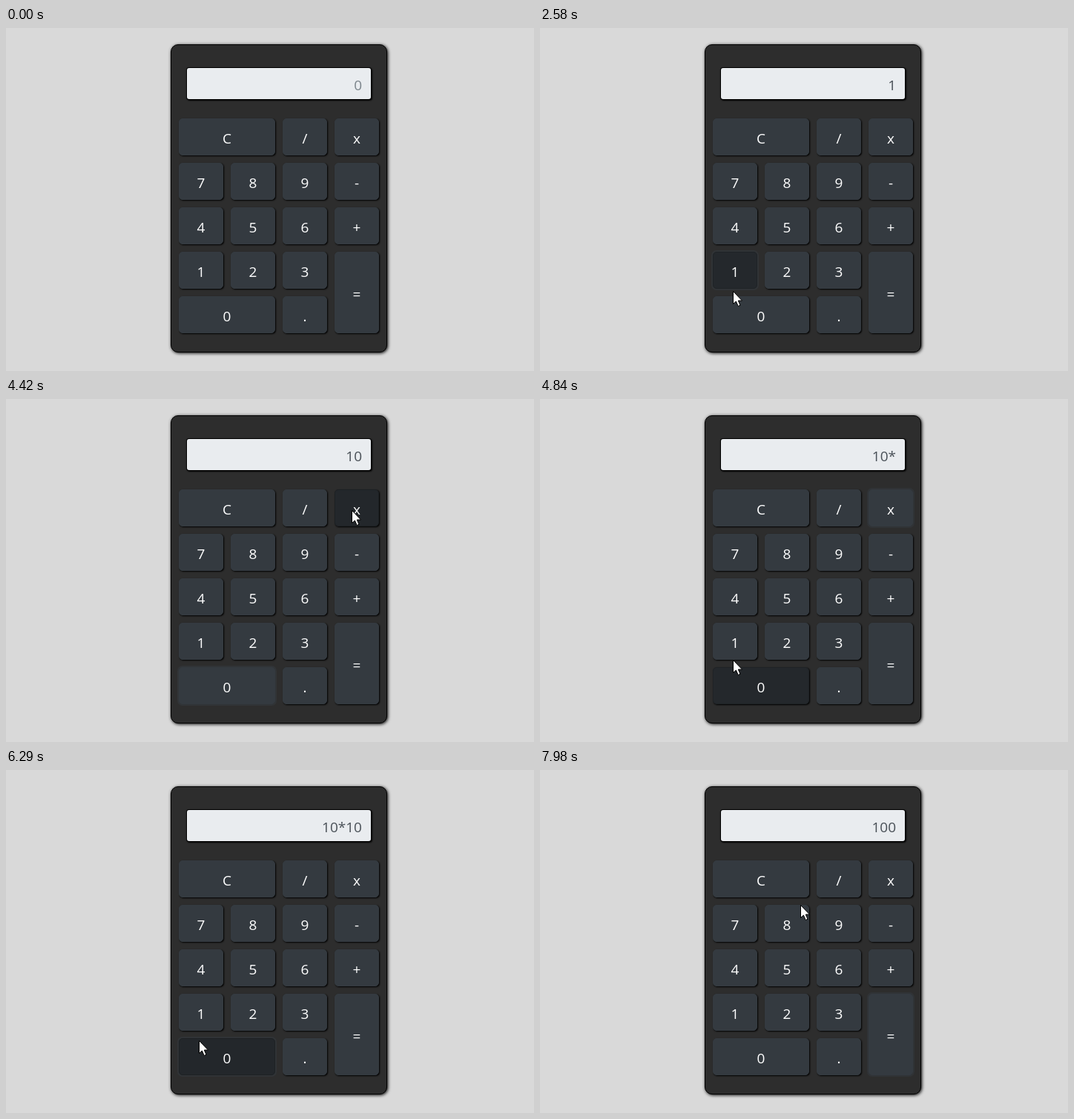
Animation, 712 px wide and 463 px high, one loop 8000 ms. Source, as an HTML page:

```html
<!DOCTYPE html>
<html lang="en">
<head>
<meta charset="utf-8">
<title>Calculator</title>
<style>
  html, body { margin: 0; width: 100%; height: 100%; overflow: hidden; background: #d9d9d9; }
  body { position: relative; font: 19px "Open Sans", "Noto Sans", sans-serif; }
  div, svg { position: absolute; box-sizing: border-box; }
  #panel {
    left: 222px; top: 22px; width: 292px; height: 416px;
    border: 1px solid #000; border-radius: 10px; background: #2d2d2d;
    box-shadow: 1px 1px 4px #000;
  }
  #display {
    left: 244px; top: 54px; width: 248px; height: 42px; padding-right: 12px;
    border-radius: 3px; background: #e9ecef; box-shadow: 0 0 0 1px #000, 1px 1px 2px 1px #000;
    color: #495057; line-height: 46px; text-align: right;
  }
  #display.empty { color: #7b848b; }
  .key { border: 1px solid; border-radius: 5px; color: #fff; text-align: center; }
  #cursor { left: -1px; top: 0; overflow: visible; }
</style>
</head>
<body>
<div id="panel"></div>
<div id="display"></div>
<svg id="cursor" width="13" height="22">
  <path d="M.5 .5V17.5L4.4 14L7.2 20.5L10 19.3L7.3 13H12.5Z" fill="#fff" stroke="#000"/>
</svg>
<script>
const LOOP = 8000, FADE = 150, STEP = 70;
const display = document.getElementById('display');
const cursor = document.getElementById('cursor');
const keys = [];

function addKey(label, col, row, cols = 1, rows = 1) {
  const el = document.createElement('div');
  const left = 233 + col * 70, top = 122 + row * 60;
  const width = cols * 70 - 10, height = rows * 60 - 10;
  el.className = 'key';
  el.textContent = label;
  el.style.cssText = `left:${left}px;top:${top}px;width:${width}px;` +
    `height:${height}px;line-height:${height + 2}px`;
  document.body.insertBefore(el, cursor);
  const contains = ([x, y]) =>
    x > left && x < left + width && y > top && y < top + height;
  keys.push({ label, el, contains });
}

addKey('C', 0, 0, 2);
addKey('/', 2, 0);
['x', '-', '+'].forEach((label, row) => addKey(label, 3, row));
['789', '456', '123'].forEach((line, row) =>
  [...line].forEach((label, col) => addKey(label, col, row + 1)));
addKey('0', 0, 4, 2);
addKey('.', 2, 4);
addKey('=', 3, 3, 1, 2);

const clicks = [
  { label: '1', at: 1960 }, { label: '0', at: 2790 }, { label: 'x', at: 4420 },
  { label: '1', at: 5120 }, { label: '0', at: 5940 }, { label: '=', at: 6760 }
];

// Pointer moves: start, end, destination; it rests in between
const entrance = [680, 465];
const moves = [
  [640, 1350, [259, 333]], [2240, 2720, [262, 364]],
  [3240, 3410, [441, 192]], [3410, 3690, [467, 150]],
  [4490, 4700, [300, 374]], [4700, 4840, [261, 352]], [4840, 4980, [260, 340]],
  [5400, 5670, [261, 365]], [6400, 6760, [470, 337]],
  [7650, 7910, [367, 202]], [7910, 7980, [352, 182]]
];

const clamp = v => Math.min(1, Math.max(0, v));
const mix = (a, b, p) => a.map((v, i) => Math.round(v + (b[i] - v) * p));
const rgb = (a, b, p) => `rgb(${mix(a, b, p)})`;

// The pointer jumps in even steps counted back from the end of each move
function pointAt(t) {
  return moves.reduce((from, [start, end, to]) => {
    const stepped = end - STEP * Math.ceil((end - t) / STEP - 1e-6);
    return mix(from, to, clamp((stepped - start) / (end - start)));
  }, entrance);
}

// Share of the last FADE ms that the pointer spent on the key
function hoverLevel(key, trail) {
  return trail.filter(key.contains).length / trail.length;
}

function focusLevel(label, t) {
  return Math.max(...clicks.map((click, i) => {
    if (click.label !== label) return 0;
    const end = i + 1 < clicks.length ? clicks[i + 1].at : Infinity;
    return clamp((t - click.at) / FADE) * (1 - clamp((t - end) / FADE));
  }));
}

function readout(t) {
  return clicks.filter(c => c.at + STEP <= t).reduce((text, { label }) =>
    label === '=' ? String(text.split('*').reduce((a, b) => a * b))
      : text + label.replace('x', '*'), '');
}

function draw(t) {
  const [x, y] = pointAt(t);
  cursor.style.transform = `translate(${x}px, ${y}px)`;

  const text = readout(t);
  display.textContent = text || '0';
  display.className = text ? '' : 'empty';

  const trail = Array.from({ length: 15 }, (_, i) => pointAt(t - i * FADE / 15));
  for (const key of keys) {
    const hover = hoverLevel(key, trail), focus = focusLevel(key.label, t);
    const style = key.el.style;
    style.backgroundColor = rgb([52, 58, 64], [35, 39, 43], hover);
    style.borderColor = rgb([52, 58, 64], [29, 33, 36], hover);
    style.boxShadow = `1px 1px 2px rgba(0,0,0,${1 - focus}), ` +
      `0 0 0 2px rgba(52,58,64,${focus / 2})`;
  }
}

function tick(now) {
  draw(now % LOOP);
  requestAnimationFrame(tick);
}
draw(0);
requestAnimationFrame(tick);
</script>
</body>
</html>
```
